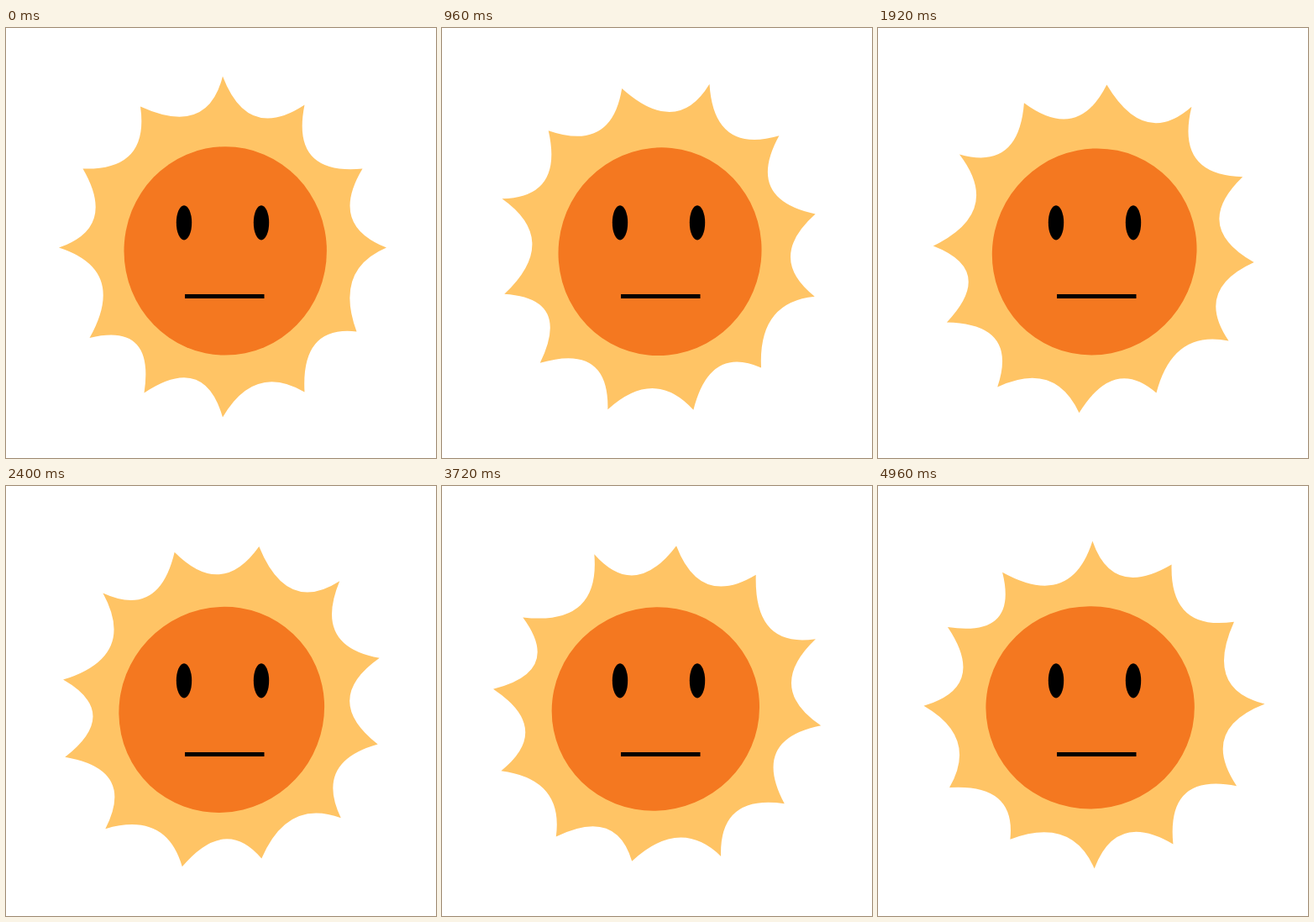
Animation of 512 by 512 pixels, one loop 5000 ms. Source, as an HTML page:

```html
<!DOCTYPE html>
<html lang="en">
<head>
<meta charset="utf-8">
<title>Sun</title>
<style>
  html, body { margin: 0; width: 100%; height: 100%; overflow: hidden; background: #fff; }
  svg { display: block; width: 100vw; height: 100vh; }
</style>
</head>
<body>
<svg viewBox="0 0 512 512">
  <g id="sun">
    <path fill="#ffc465" d="M258 57.5
      Q288 136 355.5 91.5 Q338.5 175.5 424.5 167.5
      Q384 235 453 261.5 Q390.5 288 417.5 361.5
      Q351 354 355.5 433.5 Q296 398.5 258 463.5
      Q236 387 164.5 434.5 Q177.5 350 99.5 369
      Q145 288 63 261.5 Q132.5 238 91.5 167.5
      Q171 170 160 93.5 Q240 130 258 57.5Z"/>
    <ellipse cx="261.2" cy="265.4" rx="120.7" ry="124.2" fill="#f47820"/>
  </g>
  <ellipse cx="212" cy="231.8" rx="9.2" ry="20.6"/>
  <ellipse cx="304" cy="231.8" rx="9.2" ry="20.6"/>
  <path d="M213 319.5H307.5" stroke="#000" stroke-width="5"/>
</svg>
<script>
  const LOOP = 5000, STEP = 40, DEGREES_PER_MS = 0.01808;
  const sun = document.getElementById('sun');

  function draw() {
    const time = Math.floor(performance.now() % LOOP / STEP) * STEP;
    sun.setAttribute('transform', `rotate(${time * DEGREES_PER_MS} 257.7 260.3)`);
    requestAnimationFrame(draw);
  }
  draw();
</script>
</body>
</html>
```
